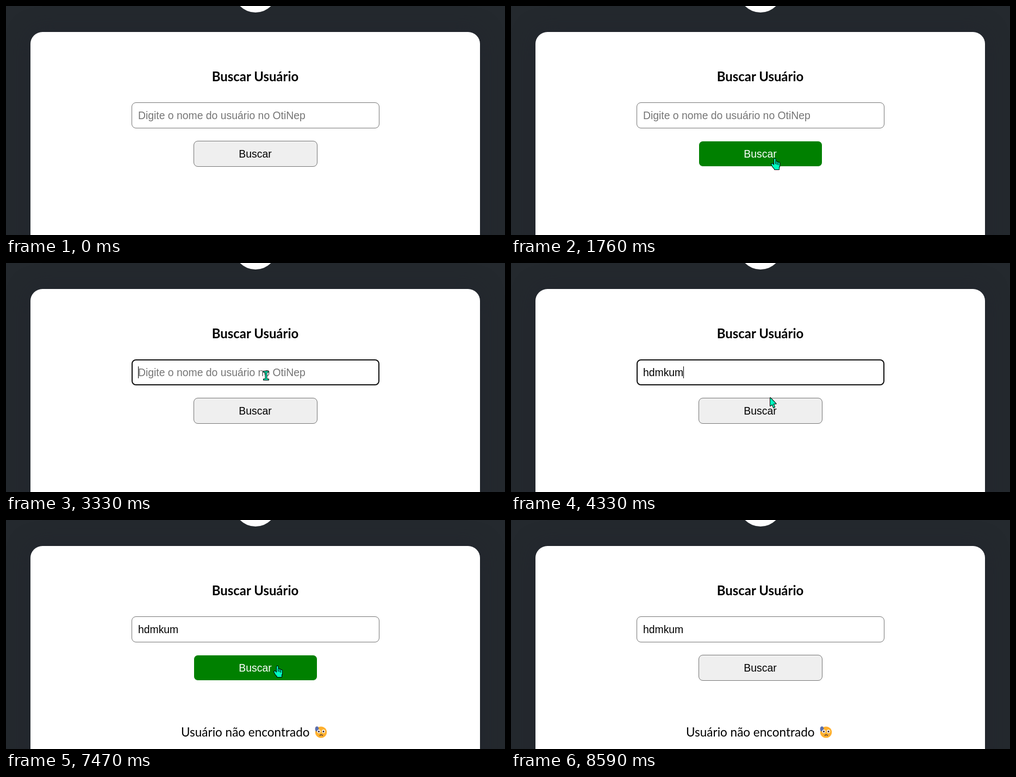
An HTML page with a canvas for the animation above (9070 ms loop, 918x423 px).

```html
<!DOCTYPE html>
<html lang="pt">
<head>
<meta charset="utf-8">
<title>Buscar Usuário</title>
<style>
  html, body { margin: 0; width: 100%; height: 100%; overflow: hidden; background: #24292e; }
  #stage { position: relative; width: 918px; height: 423px; overflow: hidden; }
  #stage div, canvas { position: absolute; box-sizing: border-box; white-space: pre; }
  #logo { left: 419px; top: -68px; width: 80px; height: 80px; border-radius: 50%; background: #fff; }
  #card { left: 45px; top: 48px; width: 827px; height: 420px; border-radius: 22px; background: #fff;
    box-shadow: 0 0 40px rgba(32, 34, 46, .55); }
  #title { left: 0; width: 917px; top: 115px; text-align: center;
    font: 700 23.9px/30px Lato, sans-serif; color: #000; }
  .box { height: 48px; border: 1px solid #767676; border-radius: 8px;
    font: 19.36px/46px "Liberation Sans", Arial, sans-serif; color: #000; }
  #field { left: 231px; top: 178px; width: 456px; padding-left: 11px; background: #fff; }
  #field.focus { border: 2px solid #101010; padding-left: 10px; line-height: 44px; }
  #field.empty { color: #757575; }
  #caret { top: 191px; width: 1px; height: 22px; background: #000; }
  #button { left: 345px; top: 249px; width: 228px; padding-right: 1px; text-align: center; background: #efefef; }
  #button.hover { background: #008000; border-color: #fff; color: #fff; }
  #message { left: 322px; top: 377px; font: 22.5px/30px Lato, sans-serif; color: #000; }
  canvas { left: 0; top: 0; }
</style>
</head>
<body>
<div id="stage">
  <div id="logo"></div>
  <div id="card"></div>
  <div id="title">Buscar Usuário</div>
  <div id="field" class="box"><span id="value"></span></div>
  <div id="caret"></div>
  <div id="button" class="box">Buscar</div>
  <div id="message">Usuário não encontrado</div>
  <canvas id="layer" width="918" height="423"></canvas>
</div>
<script>
const LOOP = 9070, STEP = 70;
const HINT = 'Digite o nome do usuário no OtiNep';
const WORD = 'hdmkum';
const FOCUS = 3170, BLUR = 4810, TYPE = 3640, KEY_GAP = 94, CARET_OFF = 4610;
const FOUND = 6220, SHOW = 650, HIDE = 8590;

// the pointer eases along a curve in each move and rests in between
const MOVES = [
  { start: 650, end: 1490, from: [706, 386], via: [530, 378], to: [485, 274] },
  { start: 1760, end: 1960, from: [485, 281], to: [497, 314] },
  { start: 2160, end: 2360, from: [496, 310], to: [489, 287] },
  { start: 2620, end: 2970, from: [488, 281], to: [478, 208] },
  { start: 4200, end: 4540, from: [478, 213], to: [475, 267] },
  { start: 7470, end: 8310, from: [499, 269], via: [640, 310], to: [825, 388] },
  { start: 8380, end: 8590, from: [832, 395], to: [862, 430] }
];

const el = id => document.getElementById(id);
const [field, value, caret, button, message] = ['field', 'value', 'caret', 'button', 'message'].map(el);
const ctx = el('layer').getContext('2d');
const clamp = (v, a, b) => Math.max(a, Math.min(b, v));

const arrow = new Path2D('M1 1V16L4.5 13 7 19 9 18 6.5 12H11.5Z');

const beam = new Path2D();
beam.rect(-4, -8, 9, 1.5);
beam.rect(-.5, -8, 2, 16);
beam.rect(-4, 6.5, 9, 1.5);

const hand = new Path2D('M0 13V20L-3.5 16 -6 11 -4 10 -1 13Z');
const fingerX = i => -1 + i * 2.5;
const fingerTop = i => i ? 5 + i : 1;
for (let i = 0; i < 4; i++) hand.roundRect(fingerX(i), fingerTop(i), 2.5, 15 - fingerTop(i), 1);
hand.rect(-1, 11, 10, 5);
hand.rect(0, 15, 8, 6);

function pointer(t) {
  if (t < SHOW || t >= HIDE) return null;
  const { start, end, from, via, to } = MOVES.filter(m => t >= m.start).pop();
  const last = Math.round((end - start) / STEP);
  const n = Math.floor((t - start) / (end - start) * last + .1);
  const u = 1 - (1 - clamp(n / last, 0, 1)) ** 2;
  return from.map((a, d) => {
    const b = via ? via[d] : (a + to[d]) / 2;
    return Math.round((1 - u) ** 2 * a + 2 * u * (1 - u) * b + u * u * to[d]);
  });
}

const inside = (p, x, y, w, h) => !!p && p[0] >= x && p[0] < x + w && p[1] >= y && p[1] < y + h;

function drawPointer([x, y], path) {
  ctx.save();
  ctx.translate(x, y);
  ctx.fillStyle = '#00ffc0';
  ctx.strokeStyle = '#000';
  ctx.lineWidth = 2;
  ctx.lineJoin = 'round';
  ctx.stroke(path);
  ctx.fill(path);
  if (path === hand) {
    ctx.fillStyle = '#000';
    for (let i = 1; i < 4; i++) ctx.fillRect(fingerX(i) - .5, fingerTop(i), 1, 5);
  }
  ctx.restore();
}

function disc(x, y, rx, ry, color) {
  ctx.fillStyle = color;
  ctx.beginPath();
  ctx.ellipse(x, y, rx, ry, 0, 0, 7);
  ctx.fill();
}

function drawFace() {
  disc(579.5, 392, 10.7, 10.5, '#ffb02e');
  disc(572, 386, 3.4, 4.8, '#5b6fae');
  for (const x of [575.5, 584]) {
    disc(x, 390.5, 3, 3.2, '#fff');
    disc(x, 390.8, 1.6, 1.8, '#402a32');
  }
  ctx.strokeStyle = '#402a32';
  ctx.lineWidth = 1.3;
  ctx.beginPath();
  ctx.arc(580, 400, 3.2, 3.6, 5.8);
  ctx.stroke();
}

function draw(t) {
  const p = pointer(t);
  const hover = inside(p, 345, 249, 228, 48);
  const typed = clamp(Math.floor((t - TYPE) / KEY_GAP) + 1, 0, WORD.length);
  const focus = t >= FOCUS && t < BLUR;

  value.textContent = typed ? WORD.slice(0, typed) : HINT;
  field.className = 'box' + (focus ? ' focus' : '') + (typed ? '' : ' empty');
  button.className = hover ? 'box hover' : 'box';
  caret.style.display = focus && t < CARET_OFF ? '' : 'none';
  caret.style.left = 243 + (typed ? value.offsetWidth : 0) + 'px';
  message.style.display = t >= FOUND ? '' : 'none';

  ctx.clearRect(0, 0, 918, 423);
  if (t >= FOUND) drawFace();
  if (p) drawPointer(p, hover ? hand : inside(p, 231, 178, 456, 48) ? beam : arrow);
}

function tick() {
  draw(performance.now() % LOOP);
  requestAnimationFrame(tick);
}
tick();
</script>
</body>
</html>
```
